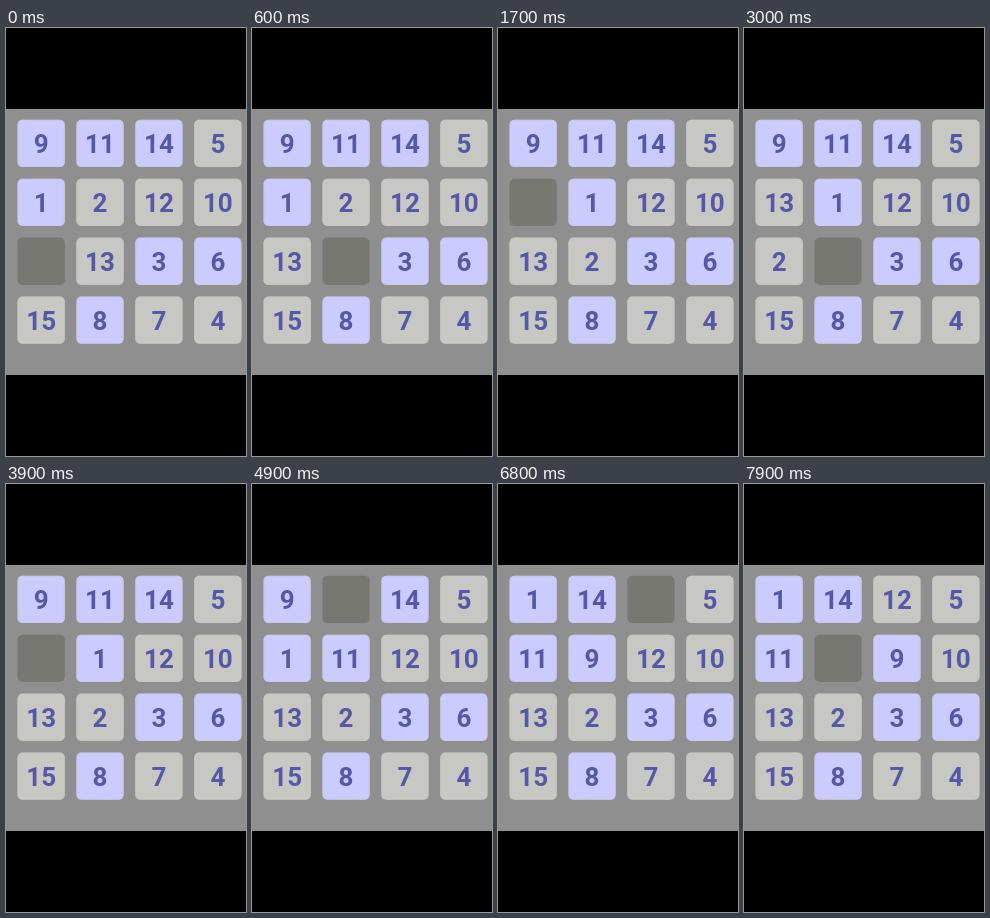
An HTML page for the animation above (8000 ms loop, 240 by 428 pixels).

```html
<!DOCTYPE html>
<html lang="en">
<head>
<meta charset="utf-8">
<title>Sliding puzzle</title>
<style>
  html, body { margin: 0; width: 100%; height: 100%; overflow: hidden; background: #000; }
  svg { display: block; }
  text { font: bold 26px Roboto, Arial, sans-serif; text-anchor: middle; fill: #5558a6; }
</style>
</head>
<body>
<svg width="240" height="428" viewBox="0 0 240 428">
  <rect y="81" width="240" height="266" fill="#8f8f8f"/>
</svg>
<script>
const LOOP = 8000, BEAT = 100, PITCH = 58.9, SIZE = 47.3;
const start = '9 11 14 5  1 2 12 10  0 13 3 6  15 8 7 4'.split(/\s+/).map(Number); // 0 is the gap
// The gap's walk: beats to wait, then the direction of its jump.
const walk = '4R 10U 3L 3D 5R 10L 3U 6R 5U 5L 2D 3R 3U 6R 4D 7L'.split(' ');
const step = { L: -1, R: 1, U: -4, D: 4 };
const column = i => i % 4, row = i => Math.floor(i / 4);
const svg = document.querySelector('svg');

function add(parent, name, attrs = {}) {
  const el = document.createElementNS('http://www.w3.org/2000/svg', name);
  for (const key in attrs) el.setAttribute(key, attrs[key]);
  return parent.appendChild(el);
}

// Tiles are coloured so that the solved board is a checkerboard.
function tileColor(n) {
  if (!n) return '#777872';
  return (column(n - 1) + row(n - 1)) % 2 ? '#c7c8c4' : '#cbcbff';
}

function makeTile(n) {
  const tile = add(svg, 'g');
  add(tile, 'rect', { width: SIZE, height: SIZE, rx: 5, fill: tileColor(n) });
  if (n) {
    add(tile, 'rect', {
      x: 0.5, y: 0.5, width: SIZE - 1, height: SIZE - 1, rx: 4.5,
      fill: 'none', stroke: '#c7c8c4', 'stroke-opacity': 0.5
    });
    add(tile, 'text', { x: SIZE / 2, y: 33.7 }).textContent = n;
  }
  return tile;
}

const tiles = Array.from(start, (_, n) => makeTile(n));

function boardAt(time) {
  const board = [...start];
  let gap = board.indexOf(0), at = 0;
  for (const move of walk) {
    at += parseInt(move) * BEAT;
    if (at > time) break;
    const next = gap + step[move.at(-1)];
    [board[gap], board[next]] = [board[next], 0];
    gap = next;
  }
  return board;
}

function draw(time) {
  boardAt(time % LOOP).forEach((n, i) => {
    const x = 11.5 + PITCH * column(i), y = 91.8 + PITCH * row(i);
    tiles[n].setAttribute('transform', `translate(${x} ${y})`);
  });
}

const begin = performance.now();
function tick() {
  draw(performance.now() - begin);
  requestAnimationFrame(tick);
}
tick();
</script>
</body>
</html>
```
